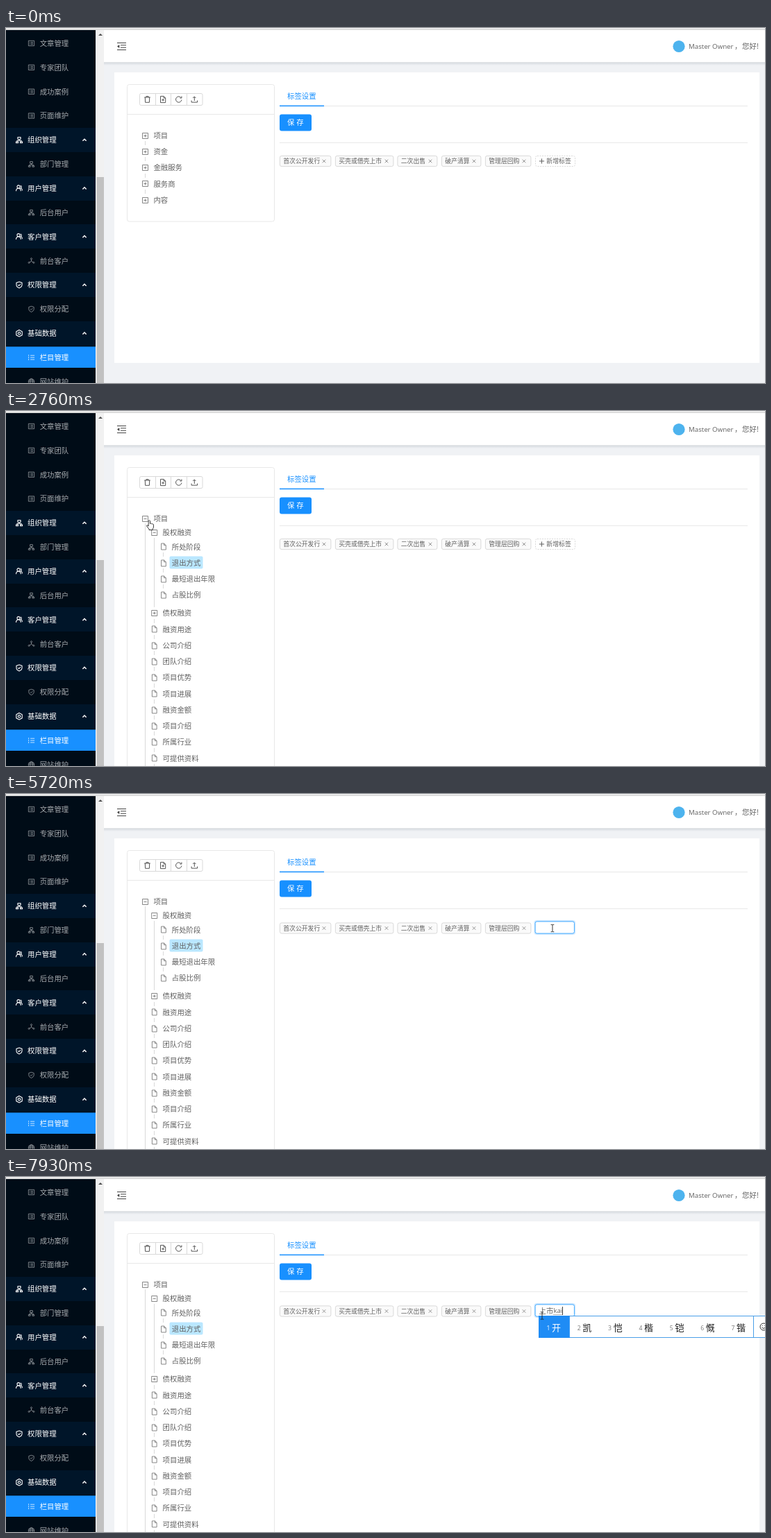
Recreate the animation shown at these times as an HTML page with a canvas. Size 1093 by 512 pixels, loop 8000 ms.

```html
<!DOCTYPE html>
<html lang="zh-CN">
<head>
<meta charset="utf-8">
<title>标签设置</title>
<style>
html, body { margin: 0; width: 100%; height: 100%; overflow: hidden; background: #f0f2f5; }
canvas { display: block; }
</style>
</head>
<body>
<canvas id="stage" width="1093" height="512"></canvas>
<script>
const LOOP = 8000;
const ctx = document.getElementById('stage').getContext('2d');
const CJK = '"Noto Sans CJK SC", "Noto Sans CJK", sans-serif';
const LATIN = '"Open Sans", "Noto Sans CJK SC", sans-serif';
const BLUE = '#1890ff', INK = '#606060', LINE = '#e8e8e8', EDGE = '#d9d9d9';

const BOX = 'M-4-4h8v8h-8zM-2 0h4';
const icons = {
  list: 'M-4.5-4h9v8h-9zM-2.7-1.8h1M-.6-1.8h3.2M-2.7 0h1M-.6 0h3.2M-2.7 1.8h1M-.6 1.8h3.2',
  org: 'M-2-4h4v3h-4zM0-1v2M-3 2.5v-1.5h6v1.5M-4.5 2.5h3v1.8h-3zM1.5 2.5h3v1.8h-3z',
  user: 'M-1-4.3a2.1 2.1 0 1 0 .01 0M-4.5 4.2c0-3 1.5-4.2 3.5-4.2s3.3 1.2 3.3 4.2M1.8-3.8a2 2 0 0 1 .5 3.6c1.4 .5 2.2 1.8 2.2 3.6',
  share: 'M0-2v2.5l-3 2M0 .5l3 2M0-4.4a1.2 1.2 0 1 0 .01 0M-3.7 1.8a1.1 1.1 0 1 0 .01 0M3.7 1.8a1.1 1.1 0 1 0 .01 0',
  shield: 'M0-4.5l4 1.3v3.2c0 2-2 3.7-4 4.5c-2-.8-4-2.5-4-4.5v-3.2zM-1.8-.2l1.4 1.4l2.4-2.6',
  gear: 'M0-4.9l4.2 2.4v5l-4.2 2.4l-4.2-2.4v-5zM1.7 0a1.7 1.7 0 1 1-3.4 0a1.7 1.7 0 1 1 3.4 0z',
  steps: 'M-1.5-3.2h6.5M-1.5 0h6.5M-1.5 3.2h6.5M-4.2-4.3v2.2M-4.2-1.1v2.2M-4.2 2.1v2.2',
  globe: 'M4.6 0a4.6 4.6 0 1 1-9.2 0a4.6 4.6 0 1 1 9.2 0zM2 0a2 4.6 0 1 1-4 0a2 4.6 0 1 1 4 0zM-4.6 0h9.2M-4-2.3h8',
  up: 'M-2.6 1.4l2.6-2.7l2.6 2.7',
  trash: 'M-4.3-3h8.6M-1.6-3v-1.4h3.2v1.4M-3.2-3l.3 7.3h5.8l.3-7.3',
  fileAdd: 'M-3.6-4.6h4.6l2.6 2.6v6.6h-7.2zM1-4.6v2.6h2.6M0-1v3.6M-1.8 .8h3.6',
  reload: 'M3.6-2.2a4.2 4.2 0 1 0 .6 2.8M4.2-4.6v2.6h-2.6',
  upload: 'M0 2v-6M-2.1-2l2.1-2.1l2.1 2.1M-4.2 1.5v2.6h8.4v-2.6',
  file: 'M-3.3-4.5h4l2.7 2.7v6.3h-6.7zM.7-4.5v2.7h2.7',
  plus: BOX + 'M0-2v4',
  minus: BOX,
  close: 'M-2.3-2.3l4.6 4.6M2.3-2.3l-4.6 4.6',
  add: 'M-3.6 0h7.2M0-3.6v7.2',
  fold: 'M-6.5-5h13M-1.5-1.7h8M-1.5 1.7h8M-6.5 5h13',
  smile: 'M5 0a5 5 0 1 1-10 0a5 5 0 1 1 10 0zM-2.6 1q2.6 3 5.2 0M-1.8-2v1M1.8-2v1',
  beam: 'M-2.3-5.2h1.6l.7.6l.7-.6h1.6M0-4.6v9.2M-2.3 5.2h1.6l.7-.6l.7.6h1.6'
};

const mix = (a, b, p) => a + (b - a) * p;
const clamp = v => Math.max(0, Math.min(1, v));

function rect(x, y, w, h, color) {
  ctx.fillStyle = color;
  ctx.fillRect(x, y, w, h);
}

function panel(x, y, w, h, r, fill, stroke) {
  ctx.beginPath();
  ctx.roundRect(x, y, w, h, r);
  if (fill) { ctx.fillStyle = fill; ctx.fill(); }
  if (stroke) { ctx.strokeStyle = stroke; ctx.lineWidth = 1; ctx.stroke(); }
}

function text(s, x, cy, color = INK, size = 10.4, font = CJK) {
  ctx.font = `${size}px ${font}`;
  ctx.fillStyle = color;
  ctx.fillText(s, x, cy + size * 0.37);
  return ctx.measureText(s).width;
}

function shape(d, x, y, stroke, fill, width = 0.9, scale = 1) {
  const p = new Path2D(d);
  ctx.save();
  ctx.translate(x, y);
  ctx.scale(scale, scale);
  ctx.lineWidth = width;
  if (fill) { ctx.fillStyle = fill; ctx.fill(p); }
  if (stroke) { ctx.strokeStyle = stroke; ctx.stroke(p); }
  ctx.restore();
}

const icon = (name, x, y, color, width, scale) => shape(icons[name], x, y, color, null, width, scale);

// Sidebar: icon, label; a leading * marks a group title
const menu = [
  ['list', '文章管理'], ['list', '专家团队'], ['list', '成功案例'], ['list', '页面维护'],
  ['org', '*组织管理'], ['org', '部门管理'], ['user', '*用户管理'], ['org', '后台用户'],
  ['user', '*客户管理'], ['share', '前台客户'], ['shield', '*权限管理'], ['shield', '权限分配'],
  ['gear', '*基础数据'], ['steps', '栏目管理'], ['globe', '网站维护']
];

function drawSidebar() {
  rect(0, 3, 129, 509, '#000c17');
  menu.forEach(([name, label], i) => {
    const y = 22 + i * 34.86;
    const title = label[0] === '*';
    const active = i === 13;
    if (title) rect(0, Math.round(y - 17.4), 129, 35, '#001529');
    if (active) rect(0, 459.5, 129, 30.5, BLUE);
    const color = title || active ? '#fff' : '#a6aaae';
    icon(name, title ? 19 : 36.5, y, color, title ? 1.1 : 0.8, title ? 1 : 0.92);
    text(title ? label.slice(1) : label, title ? 31 : 48.7, y, color);
    if (title) icon('up', 113, y, '#fff', 1.4);
  });
  rect(129, 3, 12, 509, '#f1f1f1');
  rect(130.5, 215, 10.5, 297, '#c1c1c1');
  shape('M-3 1.5l3-3l3 3z', 136, 9.5, null, '#505050');
}

function drawHeader() {
  rect(141, 3, 952, 47, '#fff');
  const g = ctx.createLinearGradient(0, 49, 0, 54);
  g.addColorStop(0, 'rgba(0,21,41,.13)');
  g.addColorStop(1, 'rgba(0,21,41,0)');
  rect(141, 49, 952, 5, g);
  rect(0, 0, 1093, 1, '#f6f6f6');
  rect(0, 1, 1093, 2, '#dcdcdc');
  icon('fold', 166.5, 26.5, '#434343', 1.1);
  shape('M-6.5 0l3.3-2.4v4.8z', 166.5, 26.5, null, '#434343');
  ctx.beginPath();
  ctx.arc(969, 26.5, 8.6, 0, Math.PI * 2);
  ctx.fillStyle = '#4db3ee';
  ctx.fill();
  text('Master Owner', 983, 26.5, INK, 9.7, LATIN);
  text('，', 1049, 26.5);
  text('您好!', 1060, 26.5);
}

// Tree rows: level, label, y, icon
const roots = ['项目', '资金', '金融服务', '服务商', '内容'];
const branch = [
  [1, '股权融资', 175.5, 'minus'],
  ...['所处阶段', '退出方式', '最短退出年限', '占股比例'].map((s, i) => [2, s, 195.8 + i * 23.25, 'file']),
  [1, '债权融资', 291.5, 'plus'],
  ...['融资用途', '公司介绍', '团队介绍', '项目优势', '项目进展', '融资金额', '项目介绍', '所属行业', '可提供资料']
    .map((s, i) => [1, s, 314.8 + i * 23.25, 'file'])
];

function drawNode([level, label, y, kind]) {
  const x = 200.5 + level * 13.2;
  if (label === '退出方式') panel(235.5, 209.5, 48, 18, 2, '#bae7ff');
  icon(kind, x, Math.floor(y) + 0.5, '#7a7a7a', 0.9);
  text(label, x + 11.9, y);
}

function drawTree(open) {
  panel(174.5, 81.5, 212, open ? 600 : 197.5, 3, null, LINE);
  rect(175, 124, 211, 1, LINE);
  panel(192.5, 94.5, 90.5, 17, 2, '#fff', EDGE);
  ['trash', 'fileAdd', 'reload', 'upload'].forEach((name, i) => {
    if (i) rect(Math.round(192 + i * 22.7), 95, 1, 17, EDGE);
    icon(name, 203.5 + i * 22.6, 103, '#555', 1);
  });
  roots.forEach((label, i) => {
    const y = 155 + i * 23.25 + (i ? open * 450 : 0);
    drawNode([0, label, y, open && !i ? 'minus' : 'plus']);
    if (i < 4 && !open) rect(200, Math.round(y + 8), 1, 6, EDGE);
  });
  if (!open) return;
  ctx.save();
  ctx.beginPath();
  ctx.rect(175, 162, 211, open * 450);
  ctx.clip();
  ctx.globalAlpha = open;
  rect(200, 162, 1, 350, EDGE);
  rect(213, 183, 1, 100, EDGE);
  branch.forEach((node, i) => {
    drawNode(node);
    if (i && i !== 4) rect(node[0] === 1 ? 213 : 226, Math.round(node[2] + 8), 1, 6, EDGE);
  });
  ctx.restore();
}

const tags = [
  ['首次公开发行', 394, 468], ['买壳或借壳上市', 474, 558], ['二次出售', 563.5, 621],
  ['破产清算', 627, 684], ['管理层回购', 690, 756]
];

function drawTags(t) {
  const editing = t >= 4880;
  const dy = editing ? 1.5 : 0;
  tags.forEach(([label, a, b]) => {
    panel(a + 0.4, 184.4 + dy, b - a - 0.5, 15.2, 2.5, '#fafafa', EDGE);
    text(label, a + 5.2, 192 + dy, INK, 8.85);
    icon('close', b - 10, 192 + dy, '#8c8c8c', 0.9);
  });
  if (!editing) {
    ctx.setLineDash([2, 1.5]);
    panel(762.5, 184.5, 57, 15, 2.5, '#fff', EDGE);
    ctx.setLineDash([]);
    const color = t >= 4060 ? '#8a8a8a' : INK;
    icon('add', 771.5, 192, color, 1);
    text('新增标签', 778.3, 192, color, 8.9);
    return;
  }
  const p = clamp((t - 4880) / 290);
  panel(760.3, 182.1, 59.9, 20.8, 4, `rgba(24,144,255,${0.2 * p})`);
  panel(762.1, 183.9, 56.3, 17.2, 2.5, '#fff', p < 0.3 ? EDGE : '#40a9ff');
}

// Typing: start, committed text, letters being composed, candidates
const typing = [
  [6380, '', 's', '是 说 上 时 所 三 死'],
  [6450, '', 'sha', '啥 杀 沙 傻 纱 砂 莎'],
  [6530, '', 'shan', '山 善 闪 扇 删 衫 珊'],
  [6600, '', 'shang', '上 商 伤 尚 赏 晌 裳'],
  [6670, '', "shang's", '上市 伤势 上述 上升 上是 上司 商事'],
  [6840, '', "shang'sh", '上市 伤势 上述 上升 上是 商事 上时'],
  [6920, '', "shang'shi", '上市 伤势 上是 赏识 上师 商事 上时'],
  [7600, '上市', '', ''],
  [7740, '上市', 'k', '看 可 快 开 课 口 卡'],
  [7800, '上市', 'ka', '卡 咖 喀 咔 咯 佧 胩'],
  [7860, '上市', 'kai', '开 凯 恺 楷 铠 慨 锴']
];

function drawTyping(t) {
  const state = typing.filter(s => s[0] <= t).pop();
  if (!state) return;
  const [, done, letters, list] = state;
  let x = 767.6;
  if (done) x += text(done, x, 192.7);
  if (letters) {
    const w = text(letters, x, 192.7, INK, 9.6, LATIN);
    ctx.setLineDash([1, 1]);
    ctx.strokeStyle = '#666';
    ctx.lineWidth = 1;
    ctx.beginPath();
    ctx.moveTo(x, 198.5);
    ctx.lineTo(x + w, 198.5);
    ctx.stroke();
    ctx.setLineDash([]);
    x += w;
  }
  rect(Math.floor(x), 187, 1, 12, '#444');
  if (list) drawCandidates(list.split(' '));
}

function drawCandidates(words) {
  const y = 200;
  const pitch = words[0].length > 1 ? 57.1 : 44.35;
  const left = Math.round(1077 - pitch * 7);
  panel(left + 0.5, y + 0.5, 460, 31, 0, '#fff', '#4a9fe8');
  rect(left, y, pitch + 0.5, 32, '#1f8cf5');
  words.forEach((word, i) => {
    const x = left + 11.4 + i * pitch;
    text(i + 1, x, y + 18, i ? '#777' : '#fff', 8.6, LATIN);
    text(word, x + 7.6, y + 17, i ? '#1a1a1a' : '#fff', 13);
  });
  rect(1076, y, 1, 32, '#4a9fe8');
  icon('smile', 1091, y + 16, '#333', 1);
}

// Pointer: time, x, y
const path = [
  [420, 946, 484], [890, 341, 194], [1080, 341, 194], [1670, 202, 150.5],
  [2400, 202, 150.5], [2760, 206, 157.5], [3220, 378, 218], [3270, 378, 218],
  [4100, 783, 194], [4320, 794, 189.5], [5340, 794, 190.5], [5720, 787, 193.5], [6060, 772, 200]
];

function pointerAt(t) {
  const i = path.findIndex(k => k[0] > t);
  if (i < 0) return path[path.length - 1].slice(1);
  const a = path[i - 1], b = path[i];
  const p = (t - a[0]) / (b[0] - a[0]);
  return [mix(a[1], b[1], p), mix(a[2], b[2], p)];
}

const ARROW = 'M0 0v10.2l2.4-2.2l1.6 3.6l1.7-.8l-1.6-3.5h3.3z';
const HAND = 'M-1.2 .9q1.2-1.8 2.4 0v4q1-.9 1.8 .2q1.1-.7 1.8 .4q1.3-.3 1.3 1.2v2.6q0 2-1.3 3.2v1.4h-5.2v-1.2l-3.6-4.7q.4-1.6 1.8-.5l1 1z';

function drawPointer(t) {
  if (t < 420) return;
  const [x, y] = pointerAt(t);
  if ((t >= 1970 && t < 2120) || (t >= 4880 && t < 4960)) {
    ctx.beginPath();
    ctx.arc(x, y, 9, 0, Math.PI * 2);
    ctx.fillStyle = 'rgba(255,255,0,.47)';
    ctx.fill();
  }
  if (t >= 4960) return icon('beam', x, y, '#222', 0.9);
  const onTree = t > 1500 && x < 240;
  const onTag = x > 762 && t > 4000;
  shape(onTree || onTag ? HAND : ARROW, x, y, '#222', '#fff', 0.9);
}

function drawSettings() {
  text('标签设置', 405, 98, BLUE);
  rect(394, 112, 674, 1, LINE);
  rect(394, 111.6, 64, 1.5, BLUE);
  panel(394, 124.6, 46, 23.8, 3, BLUE);
  text('保', 405, 136.5, '#fff');
  text('存', 418.3, 136.5, '#fff');
  rect(394, 165, 674, 1, LINE);
}

function draw(t) {
  const open = t < 2210 ? 0 : t < 2290 ? 0.45 : 1;
  rect(0, 0, 1093, 512, '#f0f2f5');
  rect(156, 64, 929, open ? 448 : 419, '#fff');
  drawHeader();
  drawSidebar();
  drawTree(open);
  drawSettings();
  drawTags(t);
  drawTyping(t);
  drawPointer(t);
}

const start = performance.now();
function tick() {
  draw((performance.now() - start) % LOOP);
  requestAnimationFrame(tick);
}
tick();
</script>
</body>
</html>
```
